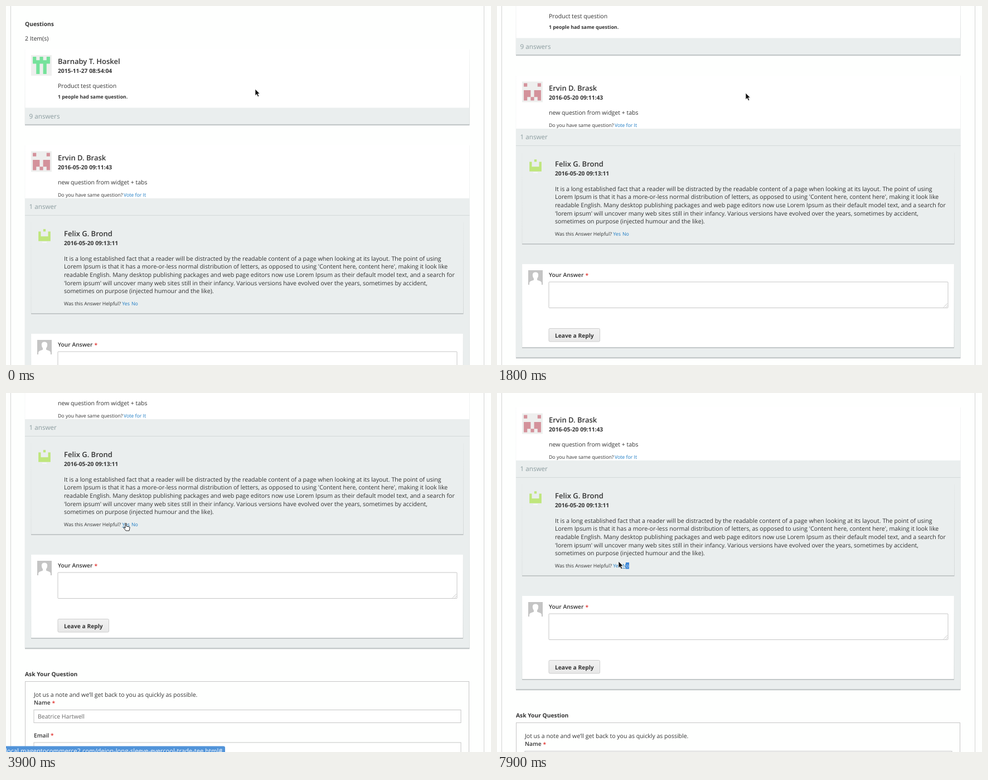
Animation of 870x644 px, one loop 8 s. Source, as an HTML page:

```html
<!DOCTYPE html>
<html lang="en">
<head>
<meta charset="utf-8">
<title>Product questions</title>
<style>
html, body { margin: 0; width: 100%; height: 100%; overflow: hidden; background: #fefffe; }
svg { display: block; width: 870px; height: 644px; }
text { font-family: "Open Sans", "Noto Sans", sans-serif; font-size: 10.52px; fill: #333; text-rendering: geometricPrecision; white-space: pre; }
.para { font-size: 10.63px; }
.bold { font-weight: 700; font-size: 10.28px; }
.label { font-weight: 600; font-size: 10.25px; }
.name { font-weight: 600; font-size: 13px; }
.small { font-size: 8.72px; }
.strong { font-weight: 700; font-size: 8.8px; }
.count { font-size: 11.7px; fill: #8b9c9f; }
.link { font-size: 8.72px; fill: #1979c3; }
.star { font-size: 10.25px; font-weight: 600; fill: #e02b27; }
.value { fill: #666; }
.status { font-size: 11.2px; fill: #fff; }
</style>
</head>
<body>
<svg id="stage" viewBox="0 0 870 644" xmlns="http://www.w3.org/2000/svg">
  <defs>
    <linearGradient id="btn" x2="0" y2="1">
      <stop offset="0" stop-color="#f1f1f1"/><stop offset="1" stop-color="#e8e8e8"/>
    </linearGradient>
    <linearGradient id="side" x2="0" y2="1">
      <stop offset="0" stop-color="#d5d9d9" stop-opacity=".25"/><stop offset="1" stop-color="#d5d9d9"/>
    </linearGradient>
  </defs>
  <path d="M8.5 0V644M857.5 0V644" stroke="#d3d4d3"/>
  <g id="page"></g>
  <g id="status">
    <path d="M0 633.5H390Q393 633.5 393 636.5V644H0Z" fill="#5294d9"/>
    <text class="status" x="388.5" y="646" text-anchor="end">local.magentocommerce2.com/deion-long-sleeve-evercool-trade-tee.html#</text>
  </g>
  <g id="cursor">
    <path id="arrow" d="M0 0V11.8L2.7 9.3L4.8 13.7L6.8 12.8L4.8 8.5H8.3Z" fill="#111" stroke="#fff" stroke-width=".7"/>
    <g id="beam" fill="none">
      <path d="M-2.5 -6H-.6L0 -5.4L.6 -6H2.5M0 -5.4V5.4M-2.5 6H-.6L0 5.4L.6 6H2.5" stroke="#fff" stroke-width="2.4"/>
      <path d="M-2.5 -6H-.6L0 -5.4L.6 -6H2.5M0 -5.4V5.4M-2.5 6H-.6L0 5.4L.6 6H2.5" stroke="#222"/>
    </g>
    <path id="hand" d="M-1 0Q0 -1 1 0V5L6 6Q7.3 6.5 7 8L6 13H0L-4 8Q-4 6.3 -2.7 7L-1 8.4Z" fill="#fff" stroke="#111" stroke-width=".9"/>
  </g>
</svg>
<script>
const $ = id => document.getElementById(id);
const page = $("page");

function add(tag, attrs, content) {
  const el = document.createElementNS("http://www.w3.org/2000/svg", tag);
  for (const k in attrs) el.setAttribute(k, attrs[k]);
  if (content) el.textContent = content;
  page.appendChild(el);
  return el;
}
const text = (x, y, s, cls = "") => add("text", { x, y, class: cls }, s);
const box = (x, y, width, height, fill) => add("rect", { x, y, width, height, fill });
const line = (d, stroke, w = 1) => add("path", { d, stroke, "stroke-width": w, fill: "none" });
const frame = (x, y, width, height, fill = "#fff", stroke = "#c6c6c6", rx = 0) =>
  add("rect", { x, y, width, height, fill, stroke, rx });

// Panel with faint sides and a soft lower edge
function panel(x, y, w, h, fill) {
  box(x, y, w, h, fill);
  box(x - .5, y, 1, h, "url(#side)").setAttribute("opacity", .5);
  box(x + w - .5, y, 1, h, "url(#side)");
  box(x, y + h - .5, w, 2, "#c3c8c9");
  box(x, y + h + 1.5, w, 1, "#eceeee");
}

function identicon(x, y, size, color, rows, bg) {
  if (bg) box(x, y, size, size, bg);
  const cell = size / 6;
  let d = "";
  rows.forEach((row, j) => [...row].forEach((c, i) => {
    if (c === "#") d += `M${x + cell * (i + .5)} ${y + cell * (j + .5)}h${cell}v${cell}h${-cell}z`;
  }));
  add("path", { d, fill: color });
}

function heading(x, y, name, date) {
  text(x, y, name, "name");
  text(x, y + 16.2, date, "bold");
}

function field(label, y, starX, value) {
  text(50, y, label, "label");
  text(starX, y + .5, "*", "star");
  frame(50, y + 9.5, 766, 23);
  text(57, y + 25.2, value, "value");
}

text(34, 36, "Questions", "bold");
text(34, 62, "2 Item(s)");

panel(34, 78, 797.5, 134.5, "#fff");
box(34, 182.5, 797.5, 29.5, "#eaeeee");
identicon(45, 88, 37, "#75e29b", ["#.#.#", "#####", ".#.#.", ".#.#.", ".#.#."], "#eeefee");
heading(93, 104, "Barnaby T. Hoskel", "2015-11-27 08:54:04");
text(93, 147, "Product test question");
text(93, 166, "1 people had same question.", "strong");
text(41.5, 202, "9 answers", "count");

panel(34, 250, 797.5, 505.5, "#fff");
identicon(45, 260.5, 37, "#d4929b", ["#...#", ".....", "##.##", "##.##", "#.#.#"], "#eeefee");
heading(93, 276.5, "Ervin D. Brask", "2016-05-20 09:11:43");
text(93, 320, "new question from widget + tabs");
text(93, 342, "Do you have same question?", "small");
text(211, 342, "Vote for It", "link");
box(34, 345, 797.5, 410, "#eaeeee");
line("M34 375.5H831.5", "#d3d9d9");
text(41.5, 364, "1 answer", "count");

panel(45, 388, 775.5, 163.5, "#eaeeee");
identicon(56, 398, 26, "#bfe67c", ["..#..", "#...#", "#...#", "#####", "#####"]);
line("M65 424H73", "#fff");
heading(104, 413, "Felix G. Brond", "2016-05-20 09:13:11");
[
  "It is a long established fact that a reader will be distracted by the readable content of a page when looking at its layout. The point of using",
  "Lorem Ipsum is that it has a more-or-less normal distribution of letters, as opposed to using 'Content here, content here', making it look like",
  "readable English. Many desktop publishing packages and web page editors now use Lorem Ipsum as their default model text, and a search for",
  "'lorem ipsum' will uncover many web sites still in their infancy. Various versions have evolved over the years, sometimes by accident,",
  "sometimes on purpose (injected humour and the like)."
].forEach((s, i) => text(104, 456.8 + i * 14.62, s, "para"));
text(104, 537.3, "Was this Answer Helpful?", "small");
text(208.3, 537.3, "Yes", "link");
text(225, 537.3, "No", "link");

panel(45, 588, 775, 149.5, "#fff");
box(56, 599, 26, 26, "#c4c4c4");
add("path", { d: "M58 625V622Q58 619 62 618L66 616.5V614Q63.8 611.5 63.8 607.5Q64 602.5 69 602.5Q74 602.5 74.2 607.5Q74.2 611.5 72 614V616.5L76 618Q80 619 80 622V625Z", fill: "#fff" });
text(93, 611, "Your Answer", "label");
text(158.5, 611.5, "*", "star");
frame(93, 620, 716, 46.5, "#fff", "#c6c6c6", 1);
line("M801 665.5L808 658.5M805 665.5L808 662.5", "#b5b5b5", .8);
frame(93, 703.5, 91.5, 23.5, "url(#btn)", "#cdcdcd", 2);
add("text", { x: 138.8, y: 719.5, class: "bold", "text-anchor": "middle" }, "Leave a Reply");

text(34, 805.5, "Ask Your Question", "bold");
frame(34.5, 815.5, 796, 220, "none");
text(50, 842.5, "Jot us a note and we’ll get back to you as quickly as possible.");
field("Name", 857, 82.5, "Beatrice Hartwell");
field("Email", 915.5, 80, "bea_hartw@example.com");

const yesLine = line("M208.3 538.6H222.5", "#1979c3", .8);
const voteLine = line("M211 343.3H251", "#1979c3", .8);
const noLine = line("M225 538.6H236.5", "#1979c3", .8);
const picked = box(231, 528, 6, 11.5, "#3d86d8");
const pickedText = text(231.6, 537.3, "o", "link");
pickedText.style.fill = "#cfe4f8";

// Keys: time, then values
const scrollKeys = [
  [0, 0], [300, 24], [600, 24], [1100, 65], [1300, 82], [1400, 82],
  [1800, 125], [2300, 198], [2700, 298], [4400, 298], [4800, 257], [5100, 224]
];
const cursorKeys = [
  [0, 447, 149], [600, 447, 149], [1100, 446, 152.5], [1800, 446, 156], [2300, 446, 158],
  [2700, 343, 246], [3200, 302, 250], [3700, 215, 234], [4400, 215, 234],
  [4800, 179, 176], [5300, 226, 112], [5800, 236, 115], [6200, 242, 112],
  [6600, 252.5, 111], [6900, 250, 95], [7100, 238, 109], [7400, 165, 220],
  [7600, 229, 318], [7700, 234, 309], [7900, 218, 302]
];

function sample(keys, t) {
  const i = keys.findIndex(k => k[0] > t);
  if (i < 0) return keys[keys.length - 1].slice(1);
  const a = keys[i - 1], b = keys[i], p = (t - a[0]) / (b[0] - a[0]);
  return a.slice(1).map((v, n) => v + (b[n + 1] - v) * p);
}
const show = (el, on) => el.setAttribute("visibility", on ? "visible" : "hidden");
const within = (t, a, b) => t >= a && t < b;

function statusAlpha(t) {
  if (within(t, 3700, 4700) || within(t, 5300, 6700)) return 1;
  if (within(t, 4700, 5000)) return 1 - (t - 4600) / 700;
  if (within(t, 6700, 7000)) return 1 - (t - 6600) / 400;
  return 0;
}

function draw(ms) {
  const t = Math.floor(ms % 8000 / 100) * 100;
  const [scroll] = sample(scrollKeys, t);
  const [x, y] = sample(cursorKeys, t);
  page.setAttribute("transform", `translate(0 ${-Math.round(scroll)})`);
  $("cursor").setAttribute("transform", `translate(${x} ${y})`);
  $("status").setAttribute("opacity", statusAlpha(t));

  const onYes = within(t, 3700, 4500), onVote = within(t, 5300, 6600);
  const overText = within(t, 4700, 5000);
  show($("hand"), onYes || onVote);
  show($("beam"), overText);
  show($("arrow"), !onYes && !onVote && !overText);
  show(yesLine, onYes);
  show(voteLine, onVote);
  show(noLine, t >= 7700);
  show(picked, t >= 7800);
  show(pickedText, t >= 7800);
}

const start = performance.now();
function tick() {
  draw(performance.now() - start);
  requestAnimationFrame(tick);
}
tick();
</script>
</body>
</html>
```
